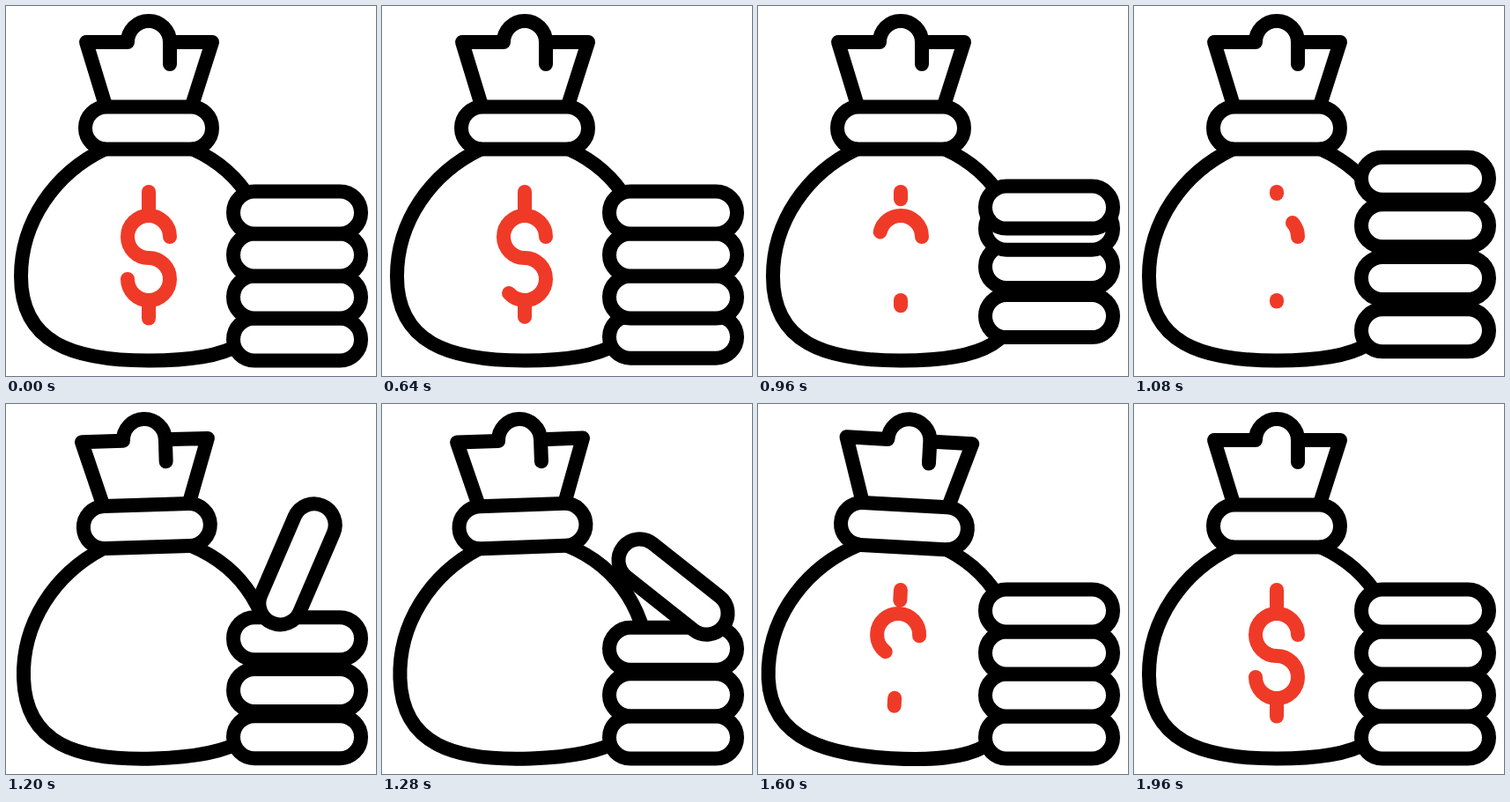
These frames come from a looping animation (420 by 420 pixels, 3 s). An HTML page:

```html
<!DOCTYPE html>
<html lang="en">
<head>
<meta charset="utf-8">
<title>Money bag</title>
<style>
  html, body { margin: 0; width: 100%; height: 100%; overflow: hidden; background: #fff; }
  svg { display: block; width: 100%; height: 100%; }
  .line { fill: none; stroke: #000; stroke-width: 16; stroke-linecap: round; stroke-linejoin: round; }
  .coin { fill: #fff; }
  #dollar { stroke: #f03a28; }
</style>
</head>
<body>
<svg viewBox="0 0 420 420">
  <g id="bag" class="line">
    <path d="M112 162.5C55 190 17 245 17 307C17 382 75 402.5 162 402.5C254 402.5 302 384 300 307C300 245 273 190 212 162.5"/>
    <path d="M113 113L91 41H138A24 24 0 0 1 186 41V66M194 41H234L211 113"/>
    <rect x="90" y="114.5" width="144" height="48" rx="24"/>
    <g id="dollar">
      <path pathLength="1" d="M162 211V238"/>
      <path pathLength="1" d="M186 262A24 24 0 1 0 162 286A24 24 0 1 1 138 310"/>
      <path pathLength="1" d="M162 334V354.5"/>
    </g>
  </g>
  <g id="coins" class="line"></g>
</svg>
<script>
const LOOP = 3000, STEP = 40;
const COIN_X = 330.5, COIN_Y = 234.5, COIN_PITCH = 48;
const bag = document.getElementById('bag');
const dollar = document.getElementById('dollar');
const strokes = dollar.querySelectorAll('path');
const stack = document.getElementById('coins');

// Drawn from the bottom up, so each coin covers the one below it.
const coins = [
  { row: 3, lift: [[600, 0], [820, -36], [1225, 0]] },
  { row: 2, lift: [[690, 0], [910, -36], [1300, 0]] },
  { row: 1, lift: [[800, 0], [1020, -36], [1360, 0]] },
  { row: 0, lift: [[900, 0], [1180, -54], [1380, 0]], spin: [[1080, 0], [1368, -180]] },
];
const sway = [[1120, 0], [1240, -2.3], [1520, 3.45], [1960, 0]];
const ink = [[600, 1], [1120, 0], [1320, 0], [1960, 1]];

for (const coin of coins) {
  coin.node = document.createElementNS('http://www.w3.org/2000/svg', 'rect');
  const box = { class: 'coin', x: -72.5, y: -24, width: 145, height: 48, rx: 24 };
  for (const name in box) coin.node.setAttribute(name, box[name]);
  stack.append(coin.node);
}

const linear = u => u;
const smooth = u => (1 - Math.cos(Math.PI * u)) / 2;

function valueAt(keys, t, ease = smooth) {
  if (t <= keys[0][0]) return keys[0][1];
  for (let i = 1; i < keys.length; i++) {
    const [t0, a] = keys[i - 1], [t1, b] = keys[i];
    if (t < t1) return a + (b - a) * ease((t - t0) / (t1 - t0));
  }
  return keys[keys.length - 1][1];
}

function draw(t) {
  bag.setAttribute('transform', `rotate(${valueAt(sway, t)} 162 210)`);

  const shown = valueAt(ink, t, linear);
  dollar.style.display = shown > 0 ? '' : 'none';
  for (const s of strokes) s.setAttribute('stroke-dasharray', shown < 1 ? `${shown} 2` : 'none');

  for (const { node, row, lift, spin } of coins) {
    const y = COIN_Y + row * COIN_PITCH + valueAt(lift, t);
    const angle = spin ? valueAt(spin, t) : 0;
    node.setAttribute('transform', `translate(${COIN_X} ${y}) rotate(${angle})`);
  }
}

function tick() {
  draw(Math.floor(performance.now() % LOOP / STEP) * STEP);
  requestAnimationFrame(tick);
}
tick();
</script>
</body>
</html>
```
